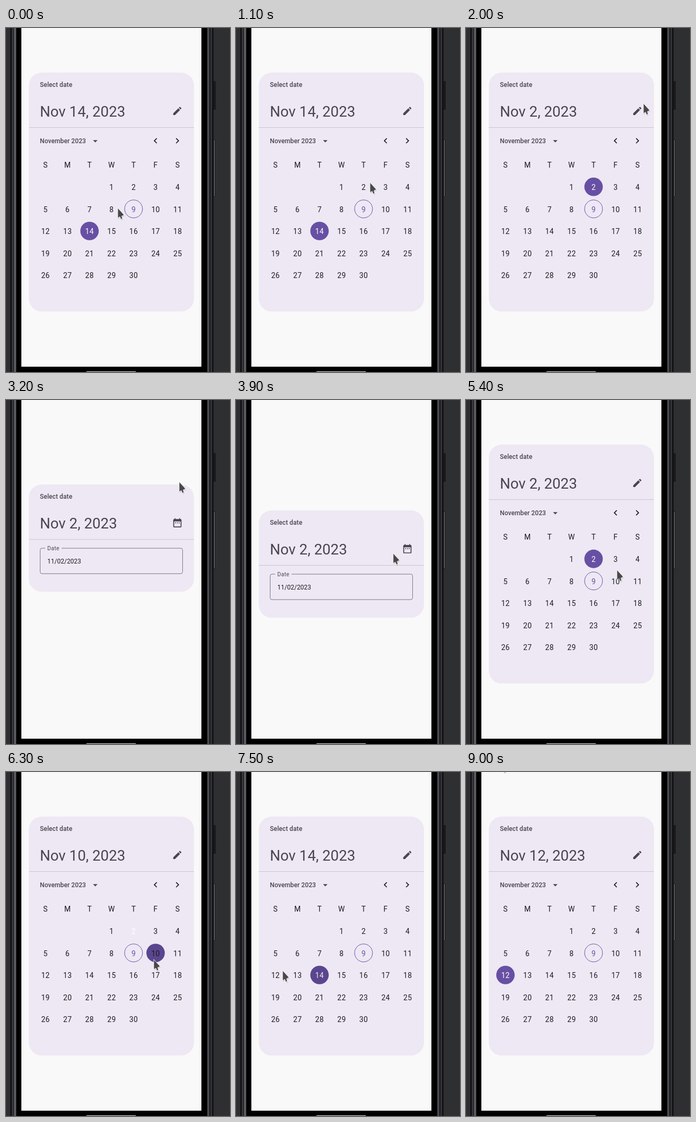
Write an HTML page that moves like this. It is 423 by 648 pixels and loops after 9300 ms.

```html
<!DOCTYPE html>
<html lang="en">
<head>
<meta charset="utf-8">
<title>Date picker</title>
<style>
  html, body { margin: 0; width: 100%; height: 100%; overflow: hidden; background: #2e2f31; }
  svg { display: block; width: 423px; height: 648px; }
  text { font-family: Roboto, sans-serif; fill: #1d1b20; }
  .label { font-size: 12.1px; font-weight: 500; letter-spacing: .05px; fill: #49454f; }
  .head { font-size: 27.7px; fill: #49454f; }
  .day { font-size: 13.9px; letter-spacing: .4px; text-anchor: middle; }
  .icon { fill: #49454f; }
  .line { fill: none; stroke: #1d1b20; stroke-width: 2; }
</style>
</head>
<body>
<svg viewBox="0 0 423 648">
  <rect width="423" height="648" fill="#2e2f31"/>
  <g id="rims"></g>
  <rect x="20" width="360" height="648"/>
  <rect x="392" y="100" width="4" height="54" rx="1" fill="#19191b"/>
  <rect x="391" y="210" width="4" height="108" rx="1" fill="#19191b"/>
  <rect x="393" y="211" width="1" height="106" fill="#85868a"/>
  <rect x="29" width="340" height="638" fill="#f9f9f9"/>
  <rect x="152" y="647" width="93" height="1" fill="#f4f4f4"/>

  <g id="card">
    <rect id="panel" x="43" width="312" rx="24.3" fill="#eee8f4"/>
    <text class="label" x="64" y="27">Select date</text>
    <text class="head" id="headline" x="64" y="83"></text>
    <g class="icon" transform="translate(313.2 61.8) scale(.867)">
      <path id="edit" d="M3 17.2V21h3.8L17.8 9.9 14.1 6.2zM21 6.300 17.700 3 15.100 5.100 18.900 8.900z"/>
      <g id="range">
        <rect x="4" y="5" width="16" height="16" rx="1" fill="none" stroke="#49454f" stroke-width="2"/>
        <path d="M4 4H20V9H4zM6 2h2v3h-2zM16 2h2v3h-2zM7 11h2v2h-2zM11 11h2v2h-2zM15 11h2v2h-2z"/>
      </g>
    </g>
    <path d="M43 103.5H355" stroke="#cac4d0"/>
    <g id="calendar">
      <text class="label" x="64" y="133">November 2023</text>
      <path class="icon" d="M164.300 127.200h8.600l-4.300 4.300z"/>
      <path class="line" transform="translate(272 118) scale(.867)" d="M14.700 6.700 9.400 12l5.300 5.300"/>
      <path class="line" transform="translate(313.200 118) scale(.867)" d="M9.300 6.700 14.600 12l-5.300 5.300"/>
      <circle id="dot" r="17.4"/>
      <g id="days"></g>
    </g>
    <g id="field">
      <rect x="64.5" y="120" width="269" height="48" rx="3.500" fill="none" stroke="#79747e"/>
      <rect x="74" y="118" width="31" height="4" fill="#eee8f4"/>
      <text x="78" y="124" font-size="10.4" letter-spacing=".35" style="fill:#49454f">Date</text>
      <text x="78" y="148.600" font-size="12">11/02/2023</text>
    </g>
  </g>

  <g id="cursor">
    <path d="M0 0V19L4 16.500 6 21.500 9 20 7.500 15.500 12 13z" transform="translate(1 2)" opacity=".13"/>
    <path d="M0 0V19L4 16.500 6 21.500 9 20 7.500 15.500 12 13z" fill="#484848" stroke="#fff" stroke-width=".8"/>
  </g>
</svg>
<script>
const LOOP = 9300, TALL = 450, SHORT = 202, MID = 309;
const INK = [29, 27, 32], PURPLE = [103, 80, 164], WHITE = [255, 255, 255], BLACK = [0, 0, 0];
const OPEN = 2860, CLOSE = 4847;
const $ = id => document.getElementById(id);
const span = (t, from, length) => Math.max(0, Math.min(1, (t - from) / length));
const smooth = u => u * u * (3 - 2 * u);
const mix = (a, b, k) => a.map((v, i) => v + (b[i] - v) * k);
const rgb = c => `rgb(${c.map(Math.round)})`;

// Each pick: time, day
const picks = [[-5000, 14], [1320, 2], [6270, 10], [7200, 14], [8250, 12]];

// Each pointer move: start, duration, end point, optional bend point
const home = [211, 339];
const moves = [
  { at: 150, len: 900, to: [253, 291], via: [285, 270] },
  { at: 1420, len: 580, to: [335, 142] },
  { at: 2200, len: 200, to: [327, 154] },
  { at: 3220, len: 950, to: [325, 267], via: [235, 350] },
  { at: 4320, len: 380, to: [315, 271] },
  { at: 5120, len: 280, to: [285, 320] },
  { at: 6020, len: 250, to: [279, 353] },
  { at: 6450, len: 610, to: [160, 386] },
  { at: 7230, len: 880, to: [66, 389], via: [-32, 351] },
  { at: 8300, len: 700, to: [66, -20] }
];

function pointer(t) {
  let p = home;
  for (const { at, len, to, via } of moves) {
    if (t < at) break;
    const u = smooth(span(t, at, len));
    const bend = via || mix(p, to, .5);
    p = mix(mix(p, bend, u), mix(bend, to, u), u);
  }
  return p;
}

// cubic-bezier(.4, 0, .2, 1)
function ease(x) {
  let lo = 0, hi = 1;
  for (let i = 0; i < 20; i++) {
    const u = (lo + hi) / 2, v = 1 - u;
    if (1.2 * u * v * v + .6 * u * u * v + u * u * u < x) lo = u; else hi = u;
  }
  return smooth(lo);
}

function add(parent, tag, attrs, text) {
  const el = document.createElementNS("http://www.w3.org/2000/svg", tag);
  for (const k in attrs) el.setAttribute(k, attrs[k]);
  if (text) el.textContent = text;
  return $(parent).appendChild(el);
}

const rim = (x, width, fill) => add("rims", "rect", { x, width, fill, height: 648 });
rim(8, 12, "#131315");
rim(11, 3, "#37383b");
rim(15, 4, "#5b5c62");
rim(380, 12, "#131315");
rim(380, 4, "#47484d");
rim(386, 3, "#333438");

const cell = day => ({
  x: 74.5 + (day + 2) % 7 * 41.6,
  y: 215.2 + Math.floor((day + 2) / 7) * 41.6
});

[..."SMTWTFS"].forEach((c, i) => add("days", "text", { class: "day", x: 74.6 + i * 41.6, y: 179.3 }, c));
const today = cell(9);
add("days", "circle", { cx: today.x, cy: today.y, r: 16.9, fill: "none", stroke: rgb(PURPLE) });
const days = [];
for (let d = 1; d <= 30; d++) {
  const p = cell(d);
  days[d] = add("days", "text", { class: "day", x: p.x + .1, y: p.y + 5.8 }, d);
}

function drawDays(t) {
  const i = picks.findLastIndex(p => p[0] <= t);
  const [start, day] = picks[i], last = i ? picks[i - 1][1] : 0;
  const age = t - start, k = span(age, 40, 130), p = cell(day);
  const press = .13 * (1 - span(age, 320, 220));
  $("dot").setAttribute("cx", p.x);
  $("dot").setAttribute("cy", p.y);
  $("dot").style.fill = rgb(mix(PURPLE, BLACK, press));
  $("headline").textContent = `Nov ${day}, 2023`;
  for (let d = 1; d <= 30; d++) {
    let c = d === 9 ? PURPLE : INK;
    if (d === day) c = mix(mix(c, WHITE, k), BLACK, press * .6);
    else if (d === last) c = mix(WHITE, c, k);
    days[d].style.fill = rgb(c);
  }
}

function draw(t) {
  const input = t >= OPEN && t < CLOSE;
  const fade = span(t, OPEN, 310) - span(t, CLOSE, 275);
  const size = ease(span(t, OPEN, 860)) - ease(span(t, CLOSE, 570));
  const top = MID - (TALL + (SHORT - TALL) * size) / 2;
  $("card").setAttribute("transform", `translate(0 ${top.toFixed(2)})`);
  $("panel").setAttribute("height", fade === 1 ? SHORT : TALL);
  $("calendar").setAttribute("opacity", 1 - fade);
  $("field").setAttribute("opacity", fade);
  $("edit").style.display = input ? "none" : "";
  $("range").style.display = input ? "" : "none";
  drawDays(t);
  $("cursor").setAttribute("transform", `translate(${pointer(t)})`);
}

const begin = performance.now();
function tick() {
  draw((performance.now() - begin) % LOOP);
  requestAnimationFrame(tick);
}
tick();
</script>
</body>
</html>
```
